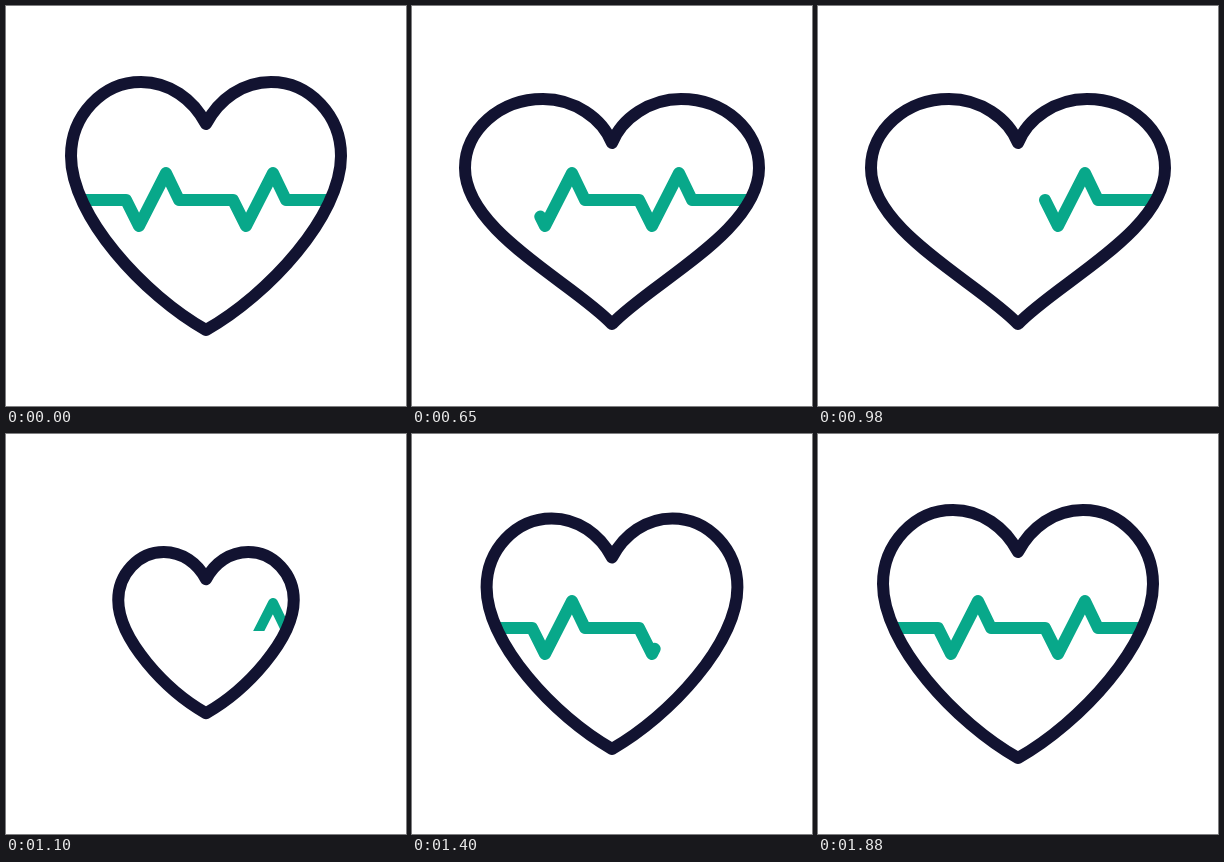
Recreate the animation shown at these times as an HTML page. Size 400 by 400 pixels, loop 2210 ms.

```html
<!DOCTYPE html>
<html lang="en">
<head>
<meta charset="utf-8">
<title>Heartbeat</title>
<style>
  html, body { margin: 0; width: 100%; height: 100%; overflow: hidden; background: #fff; }
  svg { display: block; width: 100vw; height: 100vh; }
  path { fill: none; stroke-width: 12; stroke-linecap: round; stroke-linejoin: round; }
  #heart { stroke: #121331; }
  #pulse { stroke: #08a88a; }
  #stub { stroke: #08a88a; stroke-width: 10; stroke-linecap: butt; }
</style>
</head>
<body>
<svg viewBox="0 0 400 400">
  <clipPath id="inside"><path id="inner"/></clipPath>
  <clipPath id="band"><rect id="window" x="245" y="164" width="100" height="33"/></clipPath>
  <g clip-path="url(#inside)">
    <path id="pulse" d="M68.5 194H120L133 220L160 167L173 194H227L240 220L267 167L280 194H350"/>
    <g clip-path="url(#band)"><path id="stub" d="M240 222L267 169L280 196"/></g>
  </g>
  <path id="heart"/>
</svg>
<script>
const LOOP = 2210, START = 500, STEP = 30, LAST = 46;
const $ = id => document.getElementById(id);
const heart = $('heart'), inner = $('inner'), pulse = $('pulse'), stub = $('stub'), win = $('window');
const total = pulse.getTotalLength();

// Left half of the heart, from the notch over the lobe to the tip
const rest = [[200,118],[187,93],[163,76],[135,76],[96,76],[65,110],[65,150],[65,210],[138,289],[200,324]];
const wide = [[200,137],[190,112],[162,93],[131,93],[88,93],[53,124],[53,162],[53,225],[160,276],[200,318]];
const small = rest.map(([x, y]) => [200 + (x - 200) * 0.65, 196 + (y - 196) * 0.65]);

const linear = u => u;
const settle = u => 1 - Math.pow(1 - u, 2.3);
const poses = [
  [0, rest], [5, wide, linear], [9, small, linear], [11, rest, linear],
  [16, wide, linear], [20, small, linear], [40, rest, settle], [LAST, rest, linear]
];

function poseAt(n) {
  const i = Math.max(1, poses.findIndex(p => p[0] >= n));
  const [t0, a] = poses[i - 1], [t1, b, ease] = poses[i];
  const u = ease((n - t0) / (t1 - t0));
  return a.map((p, k) => p.map((v, j) => v + (b[k][j] - v) * u));
}

function outline(half) {
  const mirrored = half.slice(0, -1).reverse().map(([x, y]) => [400 - x, y]);
  const [first, ...others] = [...half, ...mirrored];
  return 'M' + first + 'C' + others.join(' ') + 'Z';
}

function trim(from, to) {
  const length = Math.min(to, total) - from;
  pulse.style.display = length > 0 ? '' : 'none';
  pulse.style.strokeDasharray = length + ' 999';
  pulse.style.strokeDashoffset = -from;
}

function draw(n) {
  const d = outline(poseAt(n));
  heart.setAttribute('d', d);
  inner.setAttribute('d', d);
  // The old trace wipes away to the right, then a new one is drawn
  if (n < 20) trim(n * 14, total);
  else trim(0, (n - 20) * 25.9);
  stub.style.display = n >= 20 && n < 26 ? '' : 'none';
  win.setAttribute('x', 245 + Math.max(0, n - 20) * 7);
}

function tick() {
  const t = performance.now() % LOOP;
  draw(Math.min(LAST, Math.max(0, Math.floor((t - START) / STEP))));
  requestAnimationFrame(tick);
}
tick();
</script>
</body>
</html>
```
